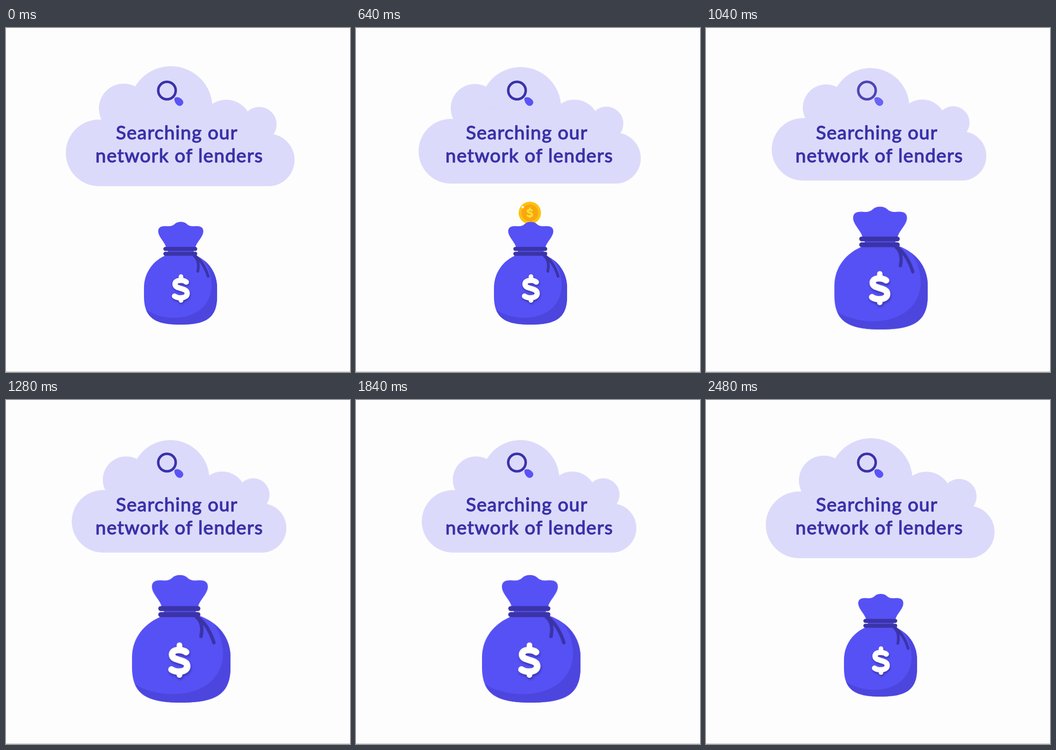
Animation of 748 by 748 pixels, one loop 2560 ms. Source, as an HTML page:

```html
<!DOCTYPE html>
<html lang="en">
<head>
<meta charset="utf-8">
<title>Searching</title>
<style>
  html, body { margin: 0; width: 100%; height: 100%; overflow: hidden; background: #fdfdfd; }
  svg { display: block; width: 100vw; height: 100vh; }
  text {
    font: 400 41px Lato, "Open Sans", sans-serif;
    letter-spacing: 1.45px;
    text-anchor: middle;
    fill: #3a32a8;
    stroke: #3a32a8;
    stroke-width: 1.4px;
    stroke-linejoin: round;
  }
  .cloud { fill: #dcdafb; }
  .skin { fill: #5651f4; }
  .shade { fill: #4c46df; }
  .rope { fill: none; stroke: #3b34a8; stroke-linecap: round; }
  .sign { fill: none; stroke-linecap: round; stroke-linejoin: round; }
  #cloud { transform-origin: 339px 148px; }
  #bag { transform-origin: 388px 591px; }
  #body { transform-origin: 345px 591px; }
  #dollar { filter: drop-shadow(1px 3px 2px rgba(40, 34, 130, .6)); }
</style>
</head>
<body>
<svg viewBox="0 0 748 748">
  <defs>
    <path id="sack" d="M350 493C320 505 300 532 300 565V583C300 629 322 645 379 645C437 645 459 629 459 583V565C459 532 440 505 409 493Z"/>
    <clipPath id="inside"><use href="#sack"/></clipPath>
    <g id="sign" class="sign">
      <path stroke-width="11.5" d="M392 552.5C386 547.5 367.5 546.5 367.5 557C367.5 569 394 564 394 577C394 589 373 588.5 366.5 583"/>
      <path stroke-width="10" d="M380.5 540.5V548M380.5 586V592.5"/>
    </g>
  </defs>

  <g id="coin">
    <circle r="24.3" fill="#fdc210"/>
    <circle r="18.3" fill="#f9a70e"/>
    <use href="#sign" stroke="#ffde36" transform="scale(.37) translate(-380.5 -567)"/>
    <circle cx="-15.5" cy="-12.5" r="2.6" fill="#fff"/>
  </g>

  <g id="cloud" class="cloud">
    <circle cx="202.5" cy="271.5" r="72.5"/>
    <circle cx="256" cy="175" r="54"/>
    <circle cx="358.5" cy="173.5" r="90.5"/>
    <circle cx="479" cy="211" r="55"/>
    <circle cx="550.5" cy="209.5" r="38"/>
    <circle cx="570.5" cy="287" r="57"/>
    <path d="M202 344H570V235L550 209L479 180L358 173L256 175L202 205Z"/>
  </g>

  <g id="lens">
    <circle cx="350" cy="136" r="19" fill="none" stroke="#3a32a8" stroke-width="5.5"/>
    <path fill="#5a54f5" d="M367 152C372 149 379 151 383 156C387 160 386 165 382 168C378 171 373 169 370 165C367 161 365 155 367 152Z"/>
  </g>
  <text x="371.5" y="241.5">Searching our</text>
  <text x="377" y="291.5">network of lenders</text>

  <g id="bag">
    <g id="body">
      <use href="#sack" class="skin"/>
      <path class="shade" clip-path="url(#inside)" d="M424 498C440 513 447 538 447 560C446 602 415 630 365 630C340 630 318 622 302 611H280V660H480V480Z"/>
    </g>
    <path class="skin" d="M352 495V485L348 477C346 466 331 454 331 442C331 433 338 430 349 431C358 431.5 363 430 367 426C373 420 387 420 393 426C397 430 402 431.5 411 431C422 430 429 433 429 442C429 454 414 466 412 477L408 485V495Z"/>
    <path class="rope" stroke-width="6" d="M409 495C418 503 420 515 417 529M411 495C425 506 434 522 439.5 540"/>
    <path class="rope" stroke-width="8.8" d="M346.5 480.3H411.5M346.5 490.8H411.5"/>
    <use id="dollar" href="#sign" stroke="#fff"/>
  </g>
  <path fill="#b4b4b4" d="M0 747H748V748H0Z"/>
</svg>
<script>
  const LOOP = 2560;
  const SOFT = "cubic-bezier(.4,0,.2,1)";
  const FALL = "cubic-bezier(.333,0,.667,.333)";

  // steps: [time, value, easing to the next step]
  function play(id, prop, toCss, steps) {
    const frames = steps.map(([t, v, easing = "linear"]) =>
      ({ offset: t / LOOP, [prop]: toCss(v), easing }));
    document.getElementById(id).animate(frames, { duration: LOOP, iterations: Infinity });
  }

  const swell = [
    [0, 0], [860, 0, "ease-in-out"], [1155, 1.17, "ease-in-out"],
    [1280, 1], [1840, 1, SOFT], [2120, 0], [LOOP, 0]
  ];
  play("bag", "transform", p => `scale(${1 + .242 * p})`, swell);
  play("body", "transform", p => `scaleX(${1 + .084 * p})`, swell);
  play("dollar", "transform", p => `translate(${-1.2 * p}px, ${4 * p}px)`, swell);

  play("cloud", "transform", s => `scale(${s})`, [
    [0, 1], [440, 1, "ease-in-out"], [860, .938],
    [1840, .938, SOFT], [2120, 1], [LOOP, 1]
  ]);

  play("coin", "transform", y => `translate(378px, ${y}px)`, [
    [0, 296], [360, 296, FALL], [720, 470], [LOOP, 470]
  ]);

  const dim = [];
  for (const start of [0, LOOP / 2]) {
    dim.push([start, 1], [start + 620, 1, "ease-in-out"],
      [start + 890, .72, "ease-in-out"], [start + 1170, 1]);
  }
  play("lens", "opacity", o => o, [...dim, [LOOP, 1]]);
</script>
</body>
</html>
```
